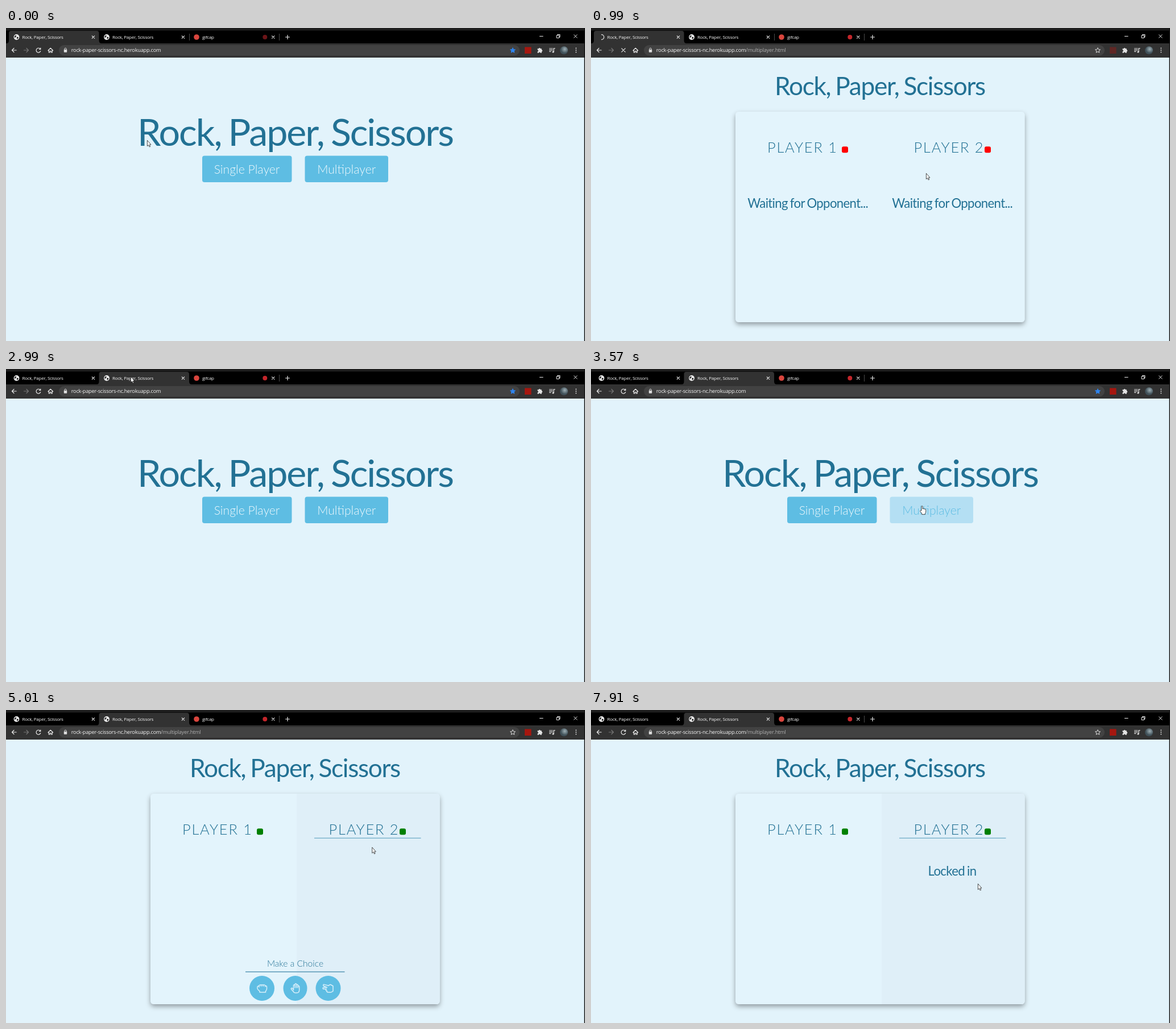
An HTML page for the animation above (8000 ms loop, 1018 by 550 pixels).

```html
<!DOCTYPE html>
<html lang="en">
<head>
<meta charset="utf-8">
<title>Rock, Paper, Scissors</title>
<style>
  html, body { margin: 0; width: 100%; height: 100%; overflow: hidden; background: #e2f3fb; }
  svg { display: block; width: 1018px; height: 550px; }
  .ui { font-family: "Open Sans", "Noto Sans", sans-serif; fill: #f4f4f4; }
  .tab-title { font-size: 8px; letter-spacing: -.26px; }
  .url { font-size: 9.2px; letter-spacing: -.24px; }
  .page text { font-family: Lato, sans-serif; font-kerning: normal; fill: #227194; }
  .head { letter-spacing: -.03em; word-spacing: -.045em; text-anchor: middle; }
  .page .light { font-weight: 300; text-anchor: middle; }
  .page .on-button { font-size: 21.2px; fill: #f0f9fd; }
  .player { font-weight: 300; font-size: 25.4px; letter-spacing: 1.8px; }
  .line { fill: none; stroke: #e8e8e8; stroke-width: 1.2; stroke-linecap: round; stroke-linejoin: round; }
  .rule { stroke: #6aa9c6; stroke-width: 1.2; }
  .hand { fill: none; stroke: #d8effa; stroke-width: 1.5; stroke-linejoin: round; stroke-linecap: round; }
</style>
</head>
<body>
<svg viewBox="0 0 1018 550" xmlns="http://www.w3.org/2000/svg">
  <defs>
    <filter id="shadow" x="-10%" y="-10%" width="120%" height="125%">
      <feDropShadow dx="0" dy="4" stdDeviation="4.5" flood-color="#000" flood-opacity=".36"/>
    </filter>
    <radialGradient id="photo" cx=".6" cy=".35">
      <stop offset="0" stop-color="#9fb0b6"/><stop offset="1" stop-color="#3f5058"/>
    </radialGradient>
    <g id="globe">
      <circle r="4.9" fill="#eee"/>
      <path d="M-3.6-1.6Q-1-4-.2-2.4Q0-.8-1.4-.4T-2 1.6Q-4 1-3.6-1.6ZM.6-.2Q3-.8 3.4.8Q2.6 3.4.8 3.6Q1.2 2 .2 1.4Z" fill="#222"/>
    </g>
    <path id="cross" class="line" d="M-2.2-2.2L2.2 2.2M2.2-2.2L-2.2 2.2"/>
  </defs>

  <rect width="1018" height="550" fill="#e2f3fb"/>

  <g class="page" id="home">
    <text class="head" x="508.500" y="207" font-size="66.3">Rock, Paper, Scissors</text>
    <rect x="345" y="224.500" width="157.500" height="46.500" rx="4" fill="#5ebde3"/>
    <text class="light on-button" x="423.500" y="256">Single Player</text>
    <rect id="multiButton" x="525.500" y="224.500" width="146.500" height="46.500" rx="4"/>
    <text id="multiLabel" class="light on-button" x="598.700" y="256">Multiplayer</text>
  </g>

  <g class="page" id="game">
    <text class="head" x="508" y="118" font-size="44.2">Rock, Paper, Scissors</text>
    <rect x="254" y="147" width="508.500" height="370" rx="6" fill="#e3f4fc" filter="url(#shadow)"/>
    <g id="active1">
      <path d="M511 147H260Q254 147 254 153V511Q254 517 260 517H511Z" fill="#dfeff8"/>
      <path class="rule" d="M288 225.200H475.500"/>
    </g>
    <g id="active2">
      <path d="M511 147H756.500Q762.500 147 762.500 153V511Q762.500 517 756.500 517H511Z" fill="#dfeff8"/>
      <path class="rule" d="M542 225.200H729.500"/>
    </g>
    <text class="player" x="310" y="219">PLAYER 1</text>
    <text class="player" x="567.600" y="219">PLAYER 2</text>
    <rect id="dot1" x="441" y="208.300" width="11" height="11" rx="3"/>
    <rect id="dot2" x="692" y="208.300" width="11" height="11" rx="3"/>
    <text id="wait1" class="head" x="381.200" y="316" font-size="22.2">Waiting for Opponent...</text>
    <text id="wait2" class="head" x="635.200" y="316" font-size="22.2">Waiting for Opponent...</text>
    <text id="locked" class="head" x="635" y="291" font-size="22.2">Locked in</text>
    <g id="choices">
      <text class="light" x="508.500" y="451" font-size="15.6">Make a Choice</text>
      <path d="M421 460.200H595.500" stroke="#3d86a8" stroke-width="1.200"/>
      <ellipse cx="450" cy="489" rx="22" ry="22" fill="#5ebde3"/>
      <ellipse id="paper" cx="508.500" cy="489" rx="21" ry="22"/>
      <ellipse cx="566.500" cy="489" rx="22" ry="22" fill="#5ebde3"/>
      <path class="hand" transform="translate(450 489)" d="M-8 0V-2Q-8-4-5.500-4Q-5-6-2.500-6H4Q5-6 6-4.500Q8.500-4.500 8.500-2V1Q8.500 3 6.500 5V7H-4V5Q-8 2-8 0ZM-5-4V-2M-1.500-5.500V-3.500M2-5.500V-3.500M5.500-4.500V-3"/>
      <path class="hand" transform="translate(508.500 489)" d="M-3 3V-5a1.300 1.300 0 0 1 2.600 0V-1V-7a1.300 1.300 0 0 1 2.600 0V-1V-5.500a1.300 1.300 0 0 1 2.600 0V-1V-3a1.200 1.200 0 0 1 2.400 0V3Q7 8 3 8H0Q-2 8-4 5L-7 1.500a1.300 1.300 0 0 1 2-1.600L-3 2.500"/>
      <path class="hand" transform="translate(566.500 489)" d="M-2-1.500L-8-4a1.400 1.400 0 0 1 1-2.600L1-4.500Q2-7 4-6.500L8.500-4V5Q5 8 2 7H-1a1.500 1.500 0 0 1-1-2.500a1.600 1.600 0 0 1-1-3.200H-8a1.400 1.400 0 0 1 0-2.800Z"/>
    </g>
  </g>

  <g id="browser">
    <rect width="1018" height="52" fill="#000"/>
    <rect width="1018" height="4.500" fill="#1d1d1d"/>
    <rect y="27" width="1018" height="25" fill="#323232"/>
    <path id="tab" d="M1 27Q5 27 5 22V9Q5 5 9 5H159.500Q163.500 5 163.500 9V22Q163.500 27 168 27Z" fill="#323232"/>
    <path id="divider" d="M322.500 10V22" stroke="#4a4a4a"/>
    <path d="M480.500 10V22" stroke="#4a4a4a"/>

    <use id="globe1" href="#globe" x="18.500" y="16"/>
    <use id="globe2" href="#globe" x="177" y="16"/>
    <path id="spinner" class="line" d="M0-4.300A4.300 4.300 0 0 1 0 4.300"/>
    <circle cx="335" cy="16" r="4.800" fill="#d9453d"/>
    <g class="ui tab-title">
      <text x="28.500" y="18.800">Rock, Paper, Scissors</text>
      <text x="187" y="18.800">Rock, Paper, Scissors</text>
      <text x="345" y="18.800">gifcap</text>
    </g>
    <circle id="record" cx="455.300" cy="16" r="4" fill="#c4262b"/>
    <use href="#cross" x="153.500" y="16"/>
    <use href="#cross" x="311.500" y="16"/>
    <use href="#cross" x="469.800" y="16"/>
    <path class="line" stroke-width="1.600" d="M491.500 16H498.500M495 12.500V19.500"/>
    <path class="line" style="stroke-width:1;stroke-linecap:butt" d="M938 14.500H944.500M968 13H972.500V17.500H968ZM969.500 13V11.500H974V16H972.500M998.300 11.500L1004.300 17.500M1004.300 11.500L998.300 17.500"/>

    <path class="line" d="M18.200 39H10.500M14 35.500L10.500 39L14 42.500"/>
    <path class="line" style="stroke:#757575" d="M31.500 39H39.500M36 35.500L39.500 39L36 42.500"/>
    <path id="reload" class="line" d="M60.300 37A3.900 3.900 0 1 0 60.700 40.500M60.800 35V37.500H58.300"/>
    <path id="stop" class="line" d="M53.800 35.800L60.200 42.200M60.200 35.800L53.800 42.200"/>
    <path class="line" d="M74 39.500L78.300 35.300L82.600 39.500M75.300 39V43H77.200V40.500H79.400V43H81.300V39"/>
    <rect x="93" y="30" width="810" height="18.500" rx="9.200" fill="#424242"/>
    <rect x="101.800" y="38" width="5.400" height="4.700" rx=".6" fill="#ddd"/>
    <path class="line" style="stroke-width:1" d="M102.900 38V36.800a1.600 1.600 0 0 1 3.200 0V38"/>
    <text class="ui url" x="114.800" y="42.300">rock-paper-scissors-nc.herokuapp.com<tspan id="path" fill="#b0b0b0">/multiplayer.html</tspan></text>
    <path id="star" stroke-width="1" stroke-linejoin="round" d="M891 34.700L892.300 37.700L895.500 38L893.100 40.100L893.800 43.200L891 41.600L888.200 43.200L888.900 40.100L886.500 38L889.700 37.700Z"/>
    <rect id="extension" x="912" y="33.500" width="11.500" height="11.500" fill="#a5170f"/>
    <path fill="#e4e4e4" d="M934.500 36.300H936.700a1.400 1.400 0 1 1 2.800 0H941.800V38.600a1.400 1.400 0 1 1 0 2.800V43.800H939.500a1.400 1.400 0 0 0-2.800 0H934.500V41.400a1.400 1.400 0 0 0 0-2.800Z"/>
    <path class="line" style="stroke-linecap:butt" d="M955 36H961.500M955 38.700H961.500M955 41.400H958.500M963 42V35.800H965.500"/>
    <circle cx="962" cy="42" r="1.600" fill="#e4e4e4"/>
    <circle cx="981" cy="39.300" r="7" fill="url(#photo)"/>
    <path d="M1002.300 35.500v.01M1002.300 39v.01M1002.300 42.500v.01" stroke="#e4e4e4" stroke-width="1.900" stroke-linecap="round"/>
  </g>
  <path d="M1017.300 0V550" stroke="#151515" stroke-width="1.400"/>

  <g id="cursor" stroke="#222" stroke-width=".8" stroke-linejoin="round" fill="#fff">
    <path id="arrow" d="M.4.400V10.600L2.600 8.600L4.200 12L5.700 11.300L4.200 8H7Z"/>
    <path id="pointer" d="M-1 8V.800a1.100 1.100 0 0 1 2.200 0V5a1 1 0 0 1 2 .2a1 1 0 0 1 1.900.4a.9.900 0 0 1 1.600.6V10Q6.500 12 5.300 13V14.600H-.2V13L-3.300 9a1.100 1.100 0 0 1 1.500-1.400Z"/>
  </g>
</svg>

<script>
const LOOP = 8000;

// Screen refreshes: [first, last, count]
const bursts = [
  [0, 0, 1], [100, 870, 9], [990, 1740, 9], [1820, 2200, 5], [2500, 2990, 6],
  [3190, 3660, 6], [3880, 4620, 9], [4720, 5280, 7], [5680, 6260, 7],
  [6550, 6550, 1], [6860, 7610, 9], [7710, 7710, 1], [7910, 7910, 1]
];
const ticks = bursts.flatMap(([a, b, n]) =>
  Array.from({ length: n }, (_, i) => a + (n > 1 ? (b - a) * i / (n - 1) : 0)));

// Mouse route: [time, x, y]
const route = [
  [0, 248, 197], [390, 400, 323], [770, 590, 258], [990, 589, 255], [1300, 589, 255],
  [1740, 466, 236], [2200, 298, 238], [2500, 437, 212], [2790, 225, 22], [2990, 219, 13],
  [3190, 260, 45], [3560, 582, 241], [3880, 582, 241], [4050, 579, 244], [4250, 579, 244],
  [4620, 538, 238], [5280, 721, 243], [5680, 715, 250], [6060, 512, 488], [6260, 513, 503],
  [6550, 513, 503], [6860, 524, 478], [7610, 648, 308], [7710, 682, 306], [7910, 680, 305]
];

const el = Object.fromEntries([...document.querySelectorAll("[id]")].map(e => [e.id, e]));
const show = (id, on) => { el[id].style.display = on ? "" : "none"; };
const fill = (id, color) => { el[id].style.fill = color; };
const between = (t, a, b) => t >= a && t < b;

function mouseAt(t) {
  const i = route.findIndex(p => p[0] > t);
  if (i < 0) return route[route.length - 1].slice(1);
  const [t0, x0, y0] = route[i - 1], [t1, x1, y1] = route[i];
  const k = (t - t0) / (t1 - t0);
  return [x0 + (x1 - x0) * k, y0 + (y1 - y0) * k];
}

function draw(time) {
  const t = ticks.reduce((last, tick) => tick <= time + .01 ? tick : last, 0);
  const secondTab = t >= 2890;
  const inGame = between(t, 990, 2890) || t >= 3970;
  const gameUrl = between(t, 870, 2890) || t >= 3880;
  const loading = between(t, 870, 1260) || between(t, 3880, 4060);
  const turn1 = between(t, 1350, 2890);
  const turn2 = t >= 4340;
  const locked = t >= 6550;
  const [x, y] = mouseAt(t);
  const overMulti = !inGame && x > 525 && x < 672 && y > 224 && y < 271;
  const overPaper = inGame && t < 6860 && Math.hypot(x - 508.5, y - 489) < 22;

  show("home", !inGame);
  show("game", inGame);
  show("active1", turn1);
  show("active2", turn2);
  show("wait1", !turn1 && !turn2);
  show("wait2", !turn2);
  show("choices", (turn1 || turn2) && !locked);
  show("locked", locked);
  fill("dot1", turn1 || turn2 ? "#008000" : "#f00");
  fill("dot2", turn2 ? "#008000" : "#f00");
  fill("multiButton", overMulti ? "#b4dff3" : "#5ebde3");
  fill("multiLabel", overMulti ? "#5ebde3" : "#f0f9fd");
  fill("paper", overPaper ? "#78c7e7" : "#5ebde3");

  el.tab.setAttribute("transform", `translate(${secondTab ? 158.5 : 0} 0)`);
  show("divider", !secondTab);
  show("globe1", secondTab || !loading);
  show("globe2", !secondTab || !loading);
  show("spinner", loading);
  el.spinner.setAttribute("transform",
    `translate(${secondTab ? 177 : 18.5} 16) rotate(${(t - 990) * .36})`);
  show("reload", !loading);
  show("stop", loading);
  show("path", gameUrl);
  fill("star", gameUrl ? "none" : "#2f86f0");
  el.star.style.stroke = gameUrl ? "#ddd" : "#2f86f0";
  el.extension.style.opacity = loading ? .4 : 1;
  el.record.style.opacity = Math.min(1, .55 + t / 1000);

  show("arrow", !overMulti && !overPaper);
  show("pointer", overMulti || overPaper);
  el.cursor.setAttribute("transform", `translate(${x} ${y})`);
}

function frame() {
  draw(performance.now() % LOOP);
  requestAnimationFrame(frame);
}
frame();
</script>
</body>
</html>
```
